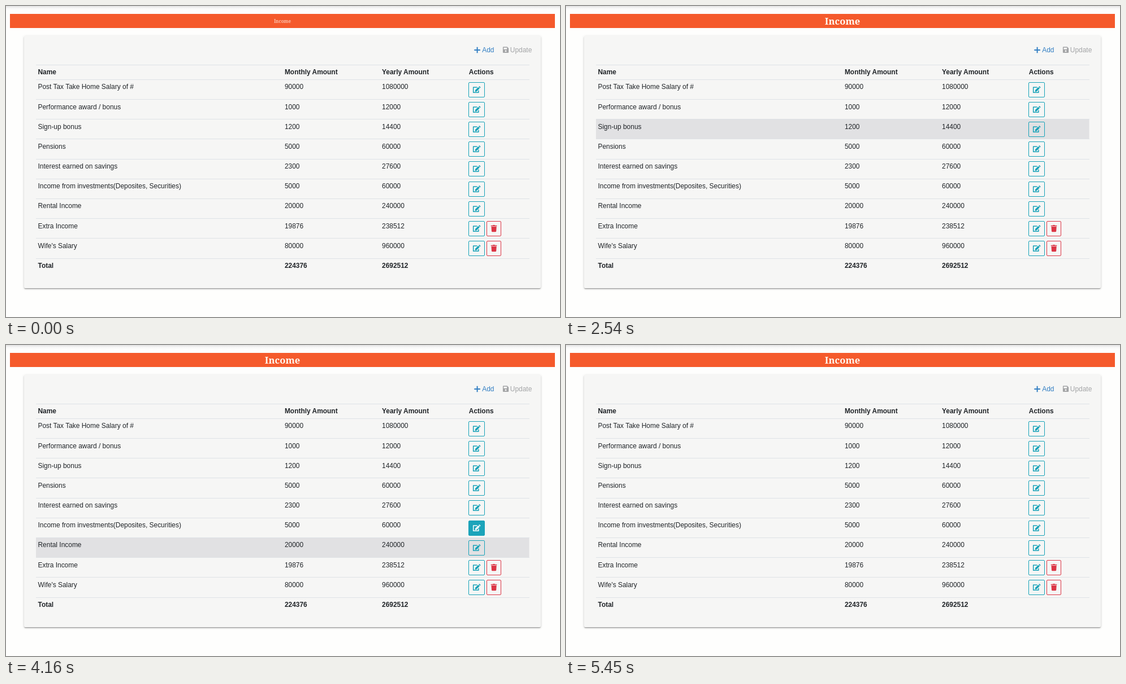
Write an HTML page that moves like this. It is 980 by 551 pixels and loops after 6000 ms.

```html
<!DOCTYPE html>
<html lang="en">
<head>
<meta charset="utf-8">
<title>Income</title>
<style>
html, body { margin: 0; width: 100%; height: 100%; overflow: hidden; background: #fefefd; }
svg { display: block; position: absolute; left: 0; top: 0; }
text { font: 11.95px "Liberation Sans", Arial, sans-serif; fill: #212529; }
.b { font-weight: bold; }
#title { font: bold 16.6px "Noto Serif", serif; fill: #fff8f0; text-anchor: middle; }
#card { position: absolute; left: 32px; top: 53px; width: 914px; height: 447px; background: #f6f6f5; border-radius: 2px;
  box-shadow: 0 1.5px 1.5px rgba(0,0,0,.2), 0 2px 1px -1.5px rgba(0,0,0,.3), 0 1px 4px rgba(0,0,0,.16); }
</style>
</head>
<body>
<div id="card"></div>
<svg width="980" height="551" viewBox="0 0 980 551">
  <defs>
    <linearGradient id="shade" x2="0" y2="1"><stop stop-color="#e2e2e2"/><stop offset=".5" stop-color="#f7f7f7"/><stop offset="1" stop-color="#fefefd"/></linearGradient>
    <g id="edit">
      <path d="M7.6 2.3H.8V11.5H10V7.8" fill="none" stroke="currentColor" stroke-width="1.5" stroke-linejoin="round"/>
      <path d="M9.5 1.9L12 4.3 6.6 9.8 3.8 10.1 4.1 7.2ZM10.2 1.2L11.6 .1 13.7 2.2 12.6 3.6Z" fill="currentColor"/>
    </g>
    <path id="trash" d="M.4 .8H3.2L3.7 0H7L7.5 .8H10.3Q10.7 .8 10.7 1.2V2.3H0V1.2Q0 .8 .4 .8ZM.8 3.1H10L9.5 11.2Q9.4 12.3 8.3 12.3H2.4Q1.3 12.3 1.3 11.2Z" fill="#dc3545"/>
  </defs>
  <rect width="980" height="8" fill="url(#shade)"/>
  <rect x="7" y="14" width="964" height="25" fill="#f55a2c"/>
  <g id="zoom"><text id="title" y="6">Income</text></g>
  <g id="add">
    <path d="M828.3 78H838.9M833.6 72.7V83.3" fill="none" stroke="currentColor" stroke-width="2"/>
    <text x="842.2" y="82" style="fill:currentColor">Add</text>
    <rect id="line" x="839" y="83" width="24.5" height="1" fill="currentColor"/>
  </g>
  <path fill="#a3a4a6" fill-rule="evenodd" d="M880 72.3H886.6L889.2 74.9V81.9Q889.2 83 888.1 83H880Q878.9 83 878.9 81.9V73.4Q878.9 72.3 880 72.3ZM880.4 73.8V76.8H886.2V73.8ZM884 78.3A1.5 1.5 0 1 0 884 81.3A1.5 1.5 0 1 0 884 78.3Z"/>
  <text x="891.8" y="82" style="fill:#a3a4a6">Update</text>
  <g id="table"></g>
</svg>
<script>
const $ = id => document.getElementById(id);
const rows = [
  ["Post Tax Take Home Salary of #", 90000], ["Performance award / bonus", 1000], ["Sign-up bonus", 1200],
  ["Pensions", 5000], ["Interest earned on savings", 2300], ["Income from investments(Deposites, Securities)", 5000],
  ["Rental Income", 20000], ["Extra Income", 19876], ["Wife's Salary", 80000]
];
// Hover spans in ms, one per row
const rowHover = [[2060, 2410], [2410, 2485], [2485, 2975], [2975, 3375], [3375, 3675], [3675, 4155], [4155, 4500], [4500, 4640], [4640, 5365]];
const btnHover = [[2110, 2405], [2425, 2465], [2815, 2975], [3020, 3375], [3485, 3665], [3705, 4155], [4185, 4500], [4525, 4630], [4695, 5325]];
const addHover = [1000, 1950];

const cells = (values, y, cls = "") => values.map((v, i) =>
  `<text class="${cls}" x="${[56.5, 492.9, 665, 818.8][i]}" y="${y}">${v}</text>`).join("");
const border = k => Math.floor(130.2 + 35.2 * k);
const rule = y => `<rect x="53" y="${y}" width="873" height="1" fill="#dee2e6"/>`;

let html = rule(104) + cells(["Name", "Monthly Amount", "Yearly Amount", "Actions"], 121, "b");
let total = 0;
rows.forEach(([name, amount], k) => {
  const top = border(k), y = Math.floor(135 + 35.2 * k);
  total += amount;
  html += `<rect class="row" x="53" y="${top + 1}" width="872.5" height="${border(k + 1) - top - 1}" fill="#e1e1e3"/>`
    + rule(top) + cells([name, amount, amount * 12], 147.4 + 35.18 * k)
    + `<g class="btn" color="#17a2b8"><rect x="818.5" y="${y + .5}" width="28" height="26" rx="1.5" fill="#17a2b8" stroke="#17a2b8"/>`
    + `<use href="#edit" x="825.9" y="${y + 6.8}"/></g>`;
  if (k > 6) html += `<rect x="850.5" y="${y + .5}" width="25" height="26" rx="1.5" fill="none" stroke="#dc3545"/>`
    + `<use href="#trash" x="857.7" y="${y + 6.9}"/>`;
});
html += rule(border(9)) + cells(["Total", total, total * 12], 464, "b");
$("table").innerHTML = html;
const rowEls = document.querySelectorAll(".row"), btnEls = document.querySelectorAll(".btn");

// CSS "ease": cubic-bezier(.25, .1, .25, 1)
function ease(x) {
  if (x <= 0) return 0;
  if (x >= 1) return 1;
  let lo = 0, hi = 1, s;
  for (let i = 0; i < 20; i++) {
    s = (lo + hi) / 2;
    if (.75 * s * (1 - s) + s ** 3 < x) lo = s; else hi = s;
  }
  return .3 * s * (1 - s) ** 2 + 3 * s * s * (1 - s) + s ** 3;
}
const within = (t, [a, b]) => t >= a && t < b;
function fade(t, [a, b]) {
  const level = ease((Math.min(t, b) - a) / 150);
  return t < b ? level : level * (1 - ease((t - b) / (150 * level)));
}

function draw(t) {
  const p = (t + 185) / 1000;
  $("zoom").setAttribute("transform", `translate(489 26.6) scale(${.3 + .7 * ease(p)})`);
  $("zoom").setAttribute("opacity", ease(p * 2));
  const over = within(t, addHover);
  $("add").setAttribute("color", over ? "#1f5a94" : "#337fc3");
  $("line").setAttribute("opacity", +over);
  rowEls.forEach((el, k) => el.setAttribute("opacity", +within(t, rowHover[k])));
  btnEls.forEach((el, k) => {
    const v = fade(t, btnHover[k]);
    el.firstChild.setAttribute("fill-opacity", v);
    el.style.color = `color-mix(in srgb, #fff ${v * 100}%, #17a2b8)`;
  });
}
const start = performance.now();
function tick() {
  draw((performance.now() - start) % 6000);
  requestAnimationFrame(tick);
}
tick();
</script>
</body>
</html>
```
